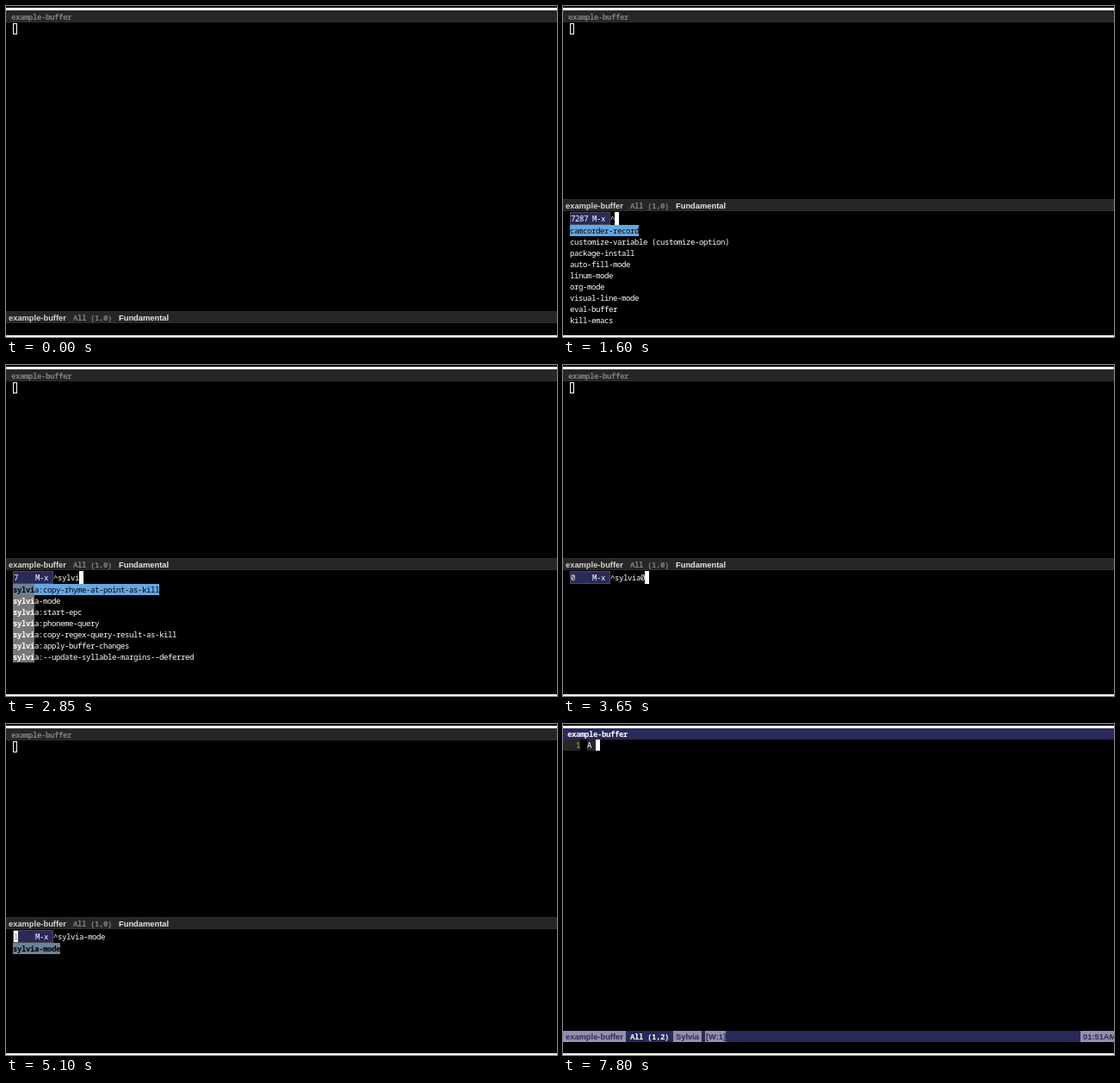
An HTML page with a canvas for the animation above (8000 ms loop, 640 by 384 pixels).

```html
<!DOCTYPE html>
<html lang="en">
<head>
<meta charset="utf-8">
<title>Editor session</title>
<style>
  html, body { margin: 0; width: 100%; height: 100%; overflow: hidden; background: #000; }
  canvas { display: block; }
</style>
</head>
<body>
<canvas id="screen" width="640" height="384"></canvas>
<script>
const ctx = document.getElementById('screen').getContext('2d');
const LOOP = 8000, CELL = 5, ROW = 13;
const MONO = '9px "Noto Sans Mono", monospace';
const MONO_BOLD = 'bold ' + MONO;
const SANS_BOLD = 'bold 9.33px "Liberation Sans", Arial, sans-serif';
const C = {
  white: '#fff', dim: '#808080', gray: '#262626', grayEdge: '#2e2e2e',
  purple: '#29295a', lavender: '#928eb4', ink: '#302b50',
  blue: '#65a7e2', match: '#777777', matchSelected: '#6c8296', yellow: '#d2c400'
};

const RECENT = ['camcorder-record', 'customize-variable (customize-option)', 'package-install',
  'auto-fill-mode', 'linum-mode', 'org-mode', 'visual-line-mode', 'eval-buffer', 'kill-emacs'];
const SYLVIA = ['sylvia:copy-rhyme-at-point-as-kill', 'sylvia-mode', 'sylvia:start-epc',
  'sylvia:phoneme-query', 'sylvia:copy-regex-query-result-as-kill',
  'sylvia:apply-buffer-changes', 'sylvia:--update-syllable-margins--deferred'];

function box(x, y, w, h, color) {
  ctx.fillStyle = color;
  ctx.fillRect(x, y, w, h);
}

// Terminal-style text: one glyph per fixed cell.
function mono(text, x, y, color, font = MONO) {
  ctx.font = font;
  ctx.fillStyle = color;
  [...text].forEach((ch, i) => ctx.fillText(ch, x + i * CELL, y));
}

function sans(text, x, y, color) {
  ctx.font = SANS_BOLD;
  ctx.fillStyle = color;
  ctx.fillText(text, x, y);
}

function grayBar(y) {
  box(0, y, 640, 14, C.grayEdge);
  box(1, y + 1, 638, 12, C.gray);
}

function inactive(barY) {
  grayBar(5);
  mono('example-buffer', 6, 16, C.dim, MONO_BOLD);
  ctx.strokeStyle = C.white;
  ctx.lineWidth = 1;
  ctx.strokeRect(8.5, 20.5, 4, 12);
  grayBar(barY);
  sans('example-buffer', 3, barY + 11, '#d4d4d4');
  mono('All (1,0)', 78, barY + 11, C.dim, MONO_BOLD);
  sans('Fundamental', 131, barY + 11, '#e6e6e6');
}

function tag(text, x, width) {
  box(x, 356, width, 13, C.lavender);
  sans(text, x + 3, 366, C.ink);
}

function active({ mode, column = 0, clock = '01:50AM', typed = '' }) {
  const sylvia = mode === 'Sylvia';
  const left = sylvia ? 28 : 8, modeWidth = sylvia ? 33 : 65;
  box(0, 5, 640, 13, C.purple);
  mono('example-buffer', 5, 15, C.white, MONO_BOLD);
  if (typed) {
    box(0, 18, 20, ROW, C.gray);
    box(left, 18, typed.length * CELL, ROW, C.gray);
    mono('1', 15, 28, C.yellow);
    mono(typed, left, 28, C.white);
  }
  box(left + typed.length * CELL, 18, CELL, ROW, C.white);
  box(0, 356, 640, 13, C.purple);
  tag('example-buffer', 0, 73);
  mono(`All (1,${column})`, 78, 366, C.white, MONO_BOLD);
  tag(mode, 128, modeWidth);
  box(132 + modeWidth, 356, 24, 13, C.lavender);
  sans('[W:1]', 133 + modeWidth, 366, C.ink);
  tag(clock, 601, 39);
}

function candidate(name, row, matched) {
  const y = 254 + row * ROW, selected = row === 0, split = matched * CELL;
  const color = selected ? '#000' : C.white;
  if (selected) box(8, y, name.length * CELL, ROW, C.blue);
  if (matched) box(8, y, split, ROW, selected ? C.matchSelected : C.match);
  mono(name.slice(0, matched), 8, y + 10, color, MONO_BOLD);
  mono(name.slice(matched), 8 + split, y + 10, color);
}

function prompt({ input = '', list, count = list.length, atStart = false }) {
  inactive(224);
  box(8, 239, 47, 15, '#4a4a58');
  box(9, 240, 45, 13, C.purple);
  const label = String(count).padEnd(5);
  mono(label + 'M-x', 9, 250, C.white);
  mono('^' + input, 55, 250, C.white);
  if (atStart) {
    box(9, 240, CELL, 13, C.white);
    mono(label[0], 9, 250, C.dim);
  } else {
    box(60 + input.length * CELL, 239, CELL, 15, C.white);
  }
  list.forEach((name, row) => candidate(name, row, input.length));
}

const search = (input, list = SYLVIA) => () => prompt({ input, list });
const only = ['sylvia-mode'];
const timeline = [
  [0, () => inactive(354)],
  [150, () => active({ mode: 'Fundamental' })],
  [1600, () => prompt({ list: RECENT, count: 7287 })],
  [1850, search('s')],
  [2050, search('sy')],
  [2250, search('syl')],
  [2400, search('sylv')],
  [2850, search('sylvi')],
  [2900, search('sylvia')],
  [3550, search('sylvia0', [])],
  [4050, search('sylvia')],
  [4250, search('sylvia-', only)],
  [4500, search('sylvia-m', only)],
  [4600, search('sylvia-mo', only)],
  [4650, search('sylvia-mod', only)],
  [4750, search('sylvia-mode', only)],
  [5050, () => prompt({ input: 'sylvia-mode', list: only, atStart: true })],
  [5500, () => active({ mode: 'Fundamental' })],
  [6400, () => active({ mode: 'Sylvia' })],
  [6950, () => active({ mode: 'Sylvia', column: 1, typed: 'A' })],
  [7800, () => active({ mode: 'Sylvia', column: 2, typed: 'A ', clock: '01:51AM' })]
];

const start = performance.now();
let shown = null;

function frame() {
  const t = (performance.now() - start) % LOOP;
  const scene = timeline.filter(([at]) => at <= t).pop()[1];
  if (scene !== shown) {
    shown = scene;
    box(0, 0, 640, 384, '#000');
    box(0, 2, 640, 3, '#fff');
    box(0, 382, 640, 2, '#fff');
    scene();
  }
  requestAnimationFrame(frame);
}
frame();
</script>
</body>
</html>
```
